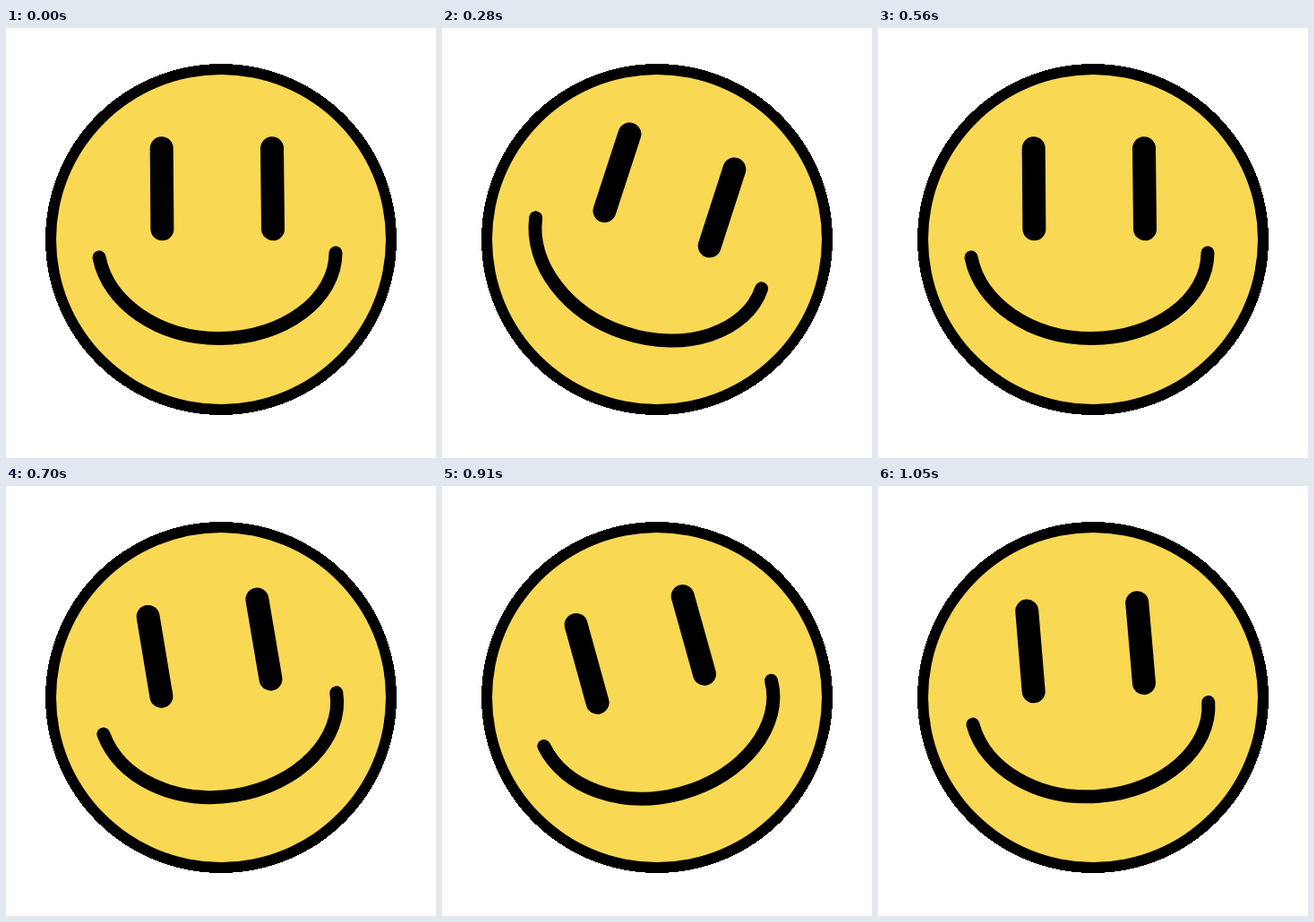
These frames come from a looping animation (480 by 480 pixels, 1120 ms). An HTML page:

```html
<!DOCTYPE html>
<html lang="en">
<head>
<meta charset="utf-8">
<title>Rocking smiley</title>
<style>
  html, body { margin: 0; width: 100%; height: 100%; overflow: hidden; background: #fff; }
  svg { display: block; width: 100vw; height: 100vh; }
</style>
</head>
<body>
<svg viewBox="0 0 480 480">
  <circle cx="240" cy="236" r="196" shape-rendering="crispEdges"/>
  <circle cx="240" cy="236" r="184" fill="#f9d853"/>
  <g id="face" fill="none" stroke="#000" stroke-linecap="round">
    <path stroke-width="26" d="M173.7 134.3L174.4 224.3M297 134.3L298 224.3"/>
    <path stroke-width="15" d="M104 256C114 307 170 346.5 238 346.5C311 346.5 368 302 368 251"/>
  </g>
</svg>
<script>
  const STEP = 70, STEPS = 16, HALF = STEPS / 2;
  const TILT = [0, 4.3, 9, 15, 18.5]; // degrees from upright to full lean
  const face = document.getElementById('face');

  // Lean right and back during the first half, left and back during the second.
  function tiltAt(ms) {
    const step = Math.floor(ms / STEP) % STEPS;
    const k = step % HALF;
    const side = step < HALF ? 1 : -1;
    return side * TILT[Math.min(k, HALF - k)];
  }

  function draw(ms) {
    face.setAttribute('transform', `rotate(${tiltAt(ms)} 240 236)`);
  }

  const start = performance.now();
  function tick() {
    draw(performance.now() - start);
    requestAnimationFrame(tick);
  }
  draw(0);
  requestAnimationFrame(tick);
</script>
</body>
</html>
```
